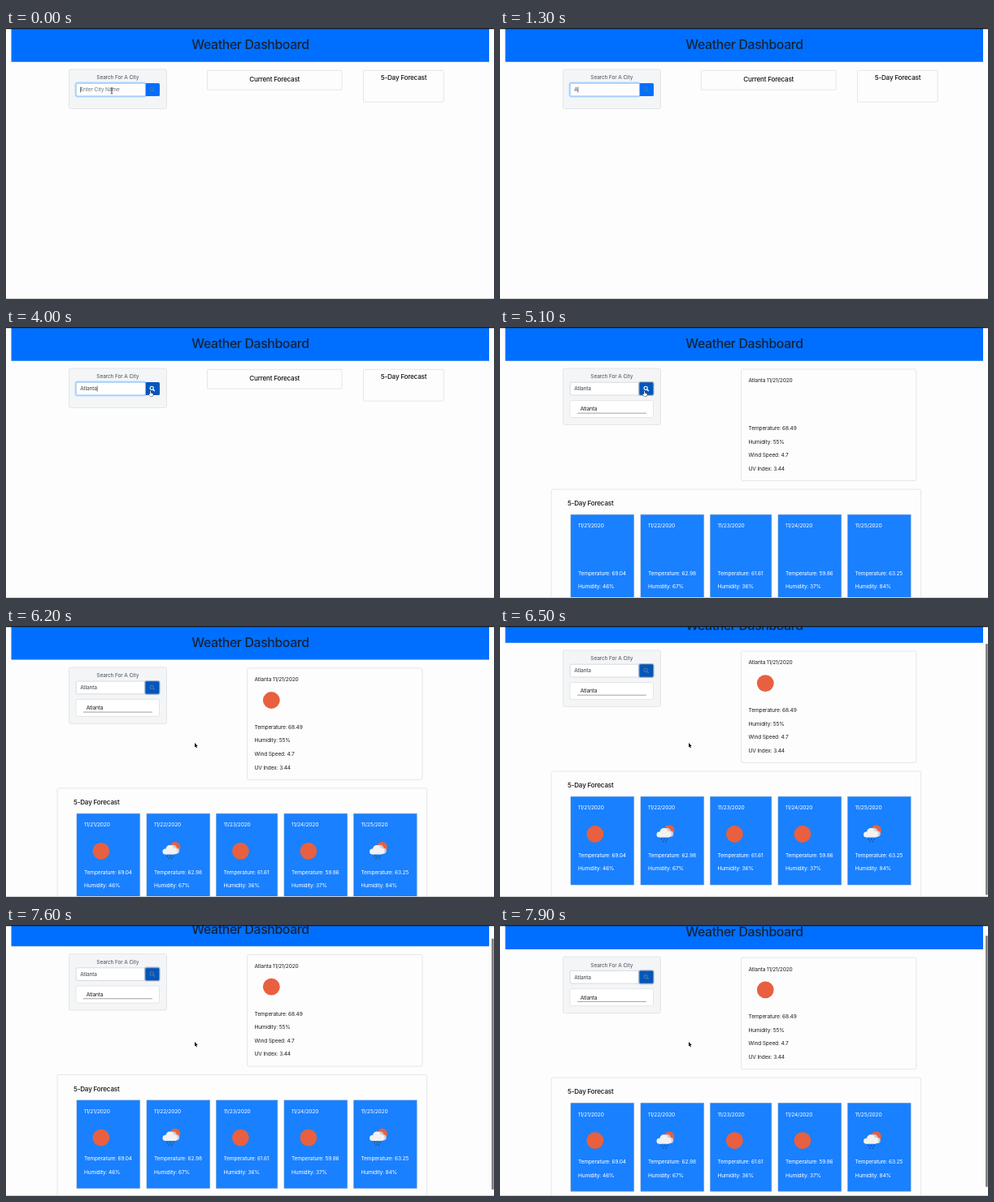
Recreate the animation shown at these times as an HTML page with a canvas. Size 600x334 px, loop 8 s.

```html
<!DOCTYPE html>
<html lang="en">
<head>
<meta charset="utf-8">
<title>Weather Dashboard</title>
<style>
html, body { margin: 0; width: 100%; height: 100%; overflow: hidden; background: #fdfdfd; }
canvas { display: block; width: 600px; height: 334px; }
</style>
</head>
<body>
<canvas id="stage"></canvas>
<script>
const canvas = document.getElementById('stage');
const c = canvas.getContext('2d');
const ratio = window.devicePixelRatio || 1;
canvas.width = 600 * ratio;
canvas.height = 334 * ratio;

const LOOP = 8000, CLICK = 4400, GROW = 4700, ICONS = 5500;
const TYPING = { word: 'Atlanta', start: 1300, step: 300 };
const INK = '#1d2023', SUN = '#e8603f', EDGE = '#dfe0e2';
const MOUSE = [[3200, 130, 77], [3700, 178, 79], [5500, 178, 79], [6100, 232, 144]];
const SCROLL = [[6200, 0], [6300, 8], [6400, 17], [6500, 21], [7100, 21], [7300, 19], [7900, 11.8]];
const DAYS = [
  [87, '11/21/2020', '69.04', '46%'],
  [173, '11/22/2020', '62.98', '67%', true],
  [258.5, '11/23/2020', '61.61', '36%'],
  [342, '11/24/2020', '59.86', '37%'],
  [427.5, '11/25/2020', '63.25', '84%', true]
];

// Linear interpolation over [time, value...] keys
function track(keys, t, i = 1) {
  if (t <= keys[0][0]) return keys[0][i];
  const k = keys.findIndex(key => key[0] > t);
  if (k < 0) return keys[keys.length - 1][i];
  const a = keys[k - 1], b = keys[k];
  return a[i] + (b[i] - a[i]) * (t - a[0]) / (b[0] - a[0]);
}

function box(x, y, right, bottom, fill, stroke, radius = 2, width = 0.8) {
  c.beginPath();
  c.roundRect(x, y, right - x, bottom - y, radius);
  if (fill) { c.fillStyle = fill; c.fill(); }
  if (stroke) { c.strokeStyle = stroke; c.lineWidth = width; c.stroke(); }
}

function disc(x, y, r, fill) {
  c.fillStyle = fill;
  c.beginPath();
  c.arc(x, y, r, 0, 7);
  c.fill();
}

function line(x1, y1, x2, y2, stroke, width) {
  c.strokeStyle = stroke;
  c.lineWidth = width;
  c.beginPath();
  c.moveTo(x1, y1);
  c.lineTo(x2, y2);
  c.stroke();
}

function setFont(size, weight, spacing) {
  c.font = `${weight} ${size}px Inter, Roboto, sans-serif`;
  c.letterSpacing = spacing + 'px';
}

function text(str, x, y, fill = INK, align = 'left') {
  setFont(6.6, 400, -0.15);
  c.fillStyle = fill;
  c.textAlign = align;
  c.fillText(str, x, y + 2.4);
}

function heading(str, x, y, align = 'center') {
  setFont(8.1, 500, -0.2);
  c.fillStyle = '#101214';
  c.textAlign = align;
  c.fillText(str, x, y + 2.9);
}

function header() {
  box(6.5, 1, 594, 41.7, '#006fff', null, 0);
  setFont(15.8, 500, -0.35);
  c.fillStyle = '#142338';
  c.textAlign = 'center';
  c.fillText('Weather Dashboard', 300.5, 26.2);
}

function searchCard(t) {
  const done = t >= CLICK;
  const hover = t >= 3600 && t < 5600;
  const typed = TYPING.word.slice(0, Math.max(0, Math.floor((t - TYPING.start) / TYPING.step) + 1));
  box(77.5, 51, 197.5, done ? 120.5 : 99.5, '#f4f5f7', EDGE);
  text('Search For A City', 137.3, 61, '#495057', 'center');

  if (!done) box(85.6, 67.6, 172, 84.4, null, '#b9d9ff', 2, 2);
  box(171.3, 68, 189, 84, done || hover ? '#0057bd' : '#006fff', null, 1.6);
  box(86.2, 68.2, 171.5, 83.9, '#fff', done ? '#cfd4da' : '#80bdff', 1.6);
  if (done) {
    box(170.8, 67.8, 188.8, 84.2, null, '#a9bdd6', 2, 1.6);
    box(171.5, 68.6, 188.2, 83.4, null, '#1d4f8d', 1.2, 0.6);
  }

  const icon = hover ? '#fff' : done ? '#51719c' : '#3575c0';
  c.strokeStyle = icon;
  c.lineWidth = 1.1;
  c.beginPath();
  c.arc(179.2, 75.3, 2.1, 0, 7);
  c.stroke();
  line(180.8, 76.9, 182.8, 78.9, icon, 1.4);

  text(typed || 'Enter City Name', 91.3, 76, typed ? '#3d4349' : '#6c757d');
  if (!done && t % 1000 < 500) {
    const x = 91.6 + (typed ? c.measureText(typed).width : 0);
    line(x, 72.5, x, 79.6, '#222', 0.6);
  }

  if (done) {
    box(86, 90.5, 188.5, 111.5, '#fff', EDGE);
    text('Atlanta', 98.7, 101);
    line(95, 106.2, 180, 106.2, '#8b8b8b', 0.8);
  }
}

function rainCloud(x, y) {
  disc(x + 5, y - 4, 6.4, SUN);
  for (const [dx, dy, r] of [[2.6, -2.6, 4.2], [6.6, 0.6, 3.6]]) disc(x + dx, y + dy, r, '#c9ced6');
  for (const [dx, dy, r] of [[-7, 1.4, 3.5], [-1.5, -1.6, 5], [4, 1, 3.8]]) disc(x + dx, y + dy, r, '#f2f2f2');
  box(x - 7, y, x + 4.5, y + 4.9, '#f2f2f2', null, 1);
  for (const [dx, dy] of [[-4.5, 6.2], [-1, 6.2], [2.5, 6.2], [-2.5, 9], [1, 9]])
    line(x + dx + 0.5, y + dy, x + dx - 0.5, y + dy + 1.9, '#343b46', 0.9);
}

function results(t) {
  const icons = t >= ICONS;
  const lift = t < GROW ? 31.5 : 0;

  box(296.5, 52, 511.8, 189.5, null, EDGE);
  text('Atlanta 11/21/2020', 305.6, 66);
  ['Temperature: 68.49', 'Humidity: 55%', 'Wind Speed: 4.7', 'UV Index: 3.44']
    .forEach((str, i) => text(str, 305.6, 124.5 + i * 16.6));
  if (icons) disc(326.3, 91.6, 10.4, SUN);

  box(63, 200, 517.6, 355 - lift, null, EDGE);
  heading('5-Day Forecast', 83, 217, 'left');
  DAYS.forEach(([x, date, temp, humidity, rain], i) => {
    box(x, 231.3, x + (i === 2 ? 75.3 : 77.6), 340 - lift, '#1980ff', '#6795cb', 0, 0.6);
    text(date, x + 9, 245, '#fff');
    text('Temperature: ' + temp, x + 9, 303.3 - lift, '#fff');
    text('Humidity: ' + humidity, x + 9, 320 - lift, '#fff');
    if (!icons) return;
    if (rain) rainCloud(x + 30, 276.6);
    else disc(x + 29.9, 277.5, 10.4, SUN);
  });
}

function shape(points, x, y, fill, stroke) {
  c.beginPath();
  points.forEach(([dx, dy]) => c.lineTo(x + dx, y + dy));
  c.closePath();
  c.lineJoin = 'round';
  c.strokeStyle = stroke;
  c.lineWidth = 0.9;
  c.stroke();
  c.fillStyle = fill;
  c.fill();
}

function pointer(t) {
  if (t >= TYPING.start && t < 3200) return;
  const x = track(MOUSE, t), y = track(MOUSE, t, 2);
  if (t < 3600) {
    line(x, y - 3, x, y + 3.6, '#222', 0.8);
    line(x - 1.4, y - 3.2, x + 1.4, y - 3.2, '#222', 0.7);
    line(x - 1.4, y + 3.8, x + 1.4, y + 3.8, '#222', 0.7);
  } else if (t < 5600) {
    shape([[-1, 0], [0, 0], [0.3, 2.4], [2.6, 2.9], [3, 4.2], [2.2, 6.4], [-0.8, 6.4],
      [-2.6, 3.9], [-2.1, 3.2], [-0.8, 4]], x, y, '#fff', '#111');
  } else {
    shape([[0, 0], [0, 5.6], [1.2, 4.5], [2.1, 6.5], [3, 6.1], [2.1, 4.2], [3.8, 4]], x, y, '#111', '#fff');
  }
}

function draw(t) {
  const scroll = track(SCROLL, t);
  c.setTransform(ratio, 0, 0, ratio, 0, 0);
  c.fillStyle = '#fdfdfd';
  c.fillRect(0, 0, 600, 334);

  c.save();
  c.translate(0, -scroll);
  header();
  searchCard(t);
  if (t >= CLICK) {
    results(t);
  } else {
    box(247.5, 52.3, 413, 76.2, null, EDGE, 1);
    heading('Current Forecast', 330.2, 62.6);
    box(439.5, 52.3, 538.2, 91.2, null, EDGE, 1);
    heading('5-Day Forecast', 489, 61.2);
  }
  c.restore();

  if (t >= 6400) box(597, 2 + scroll * 0.94, 599.8, 312 + scroll * 0.94, '#818181', null, 1.4);
  c.fillStyle = '#16181c';
  c.fillRect(0, 0, 600, 1.3);
  c.fillStyle = '#cfcfcf';
  c.fillRect(0, 333, 600, 1);
  pointer(t);
}

const start = performance.now();
function tick() {
  draw((performance.now() - start) % LOOP);
  requestAnimationFrame(tick);
}
tick();
</script>
</body>
</html>
```
